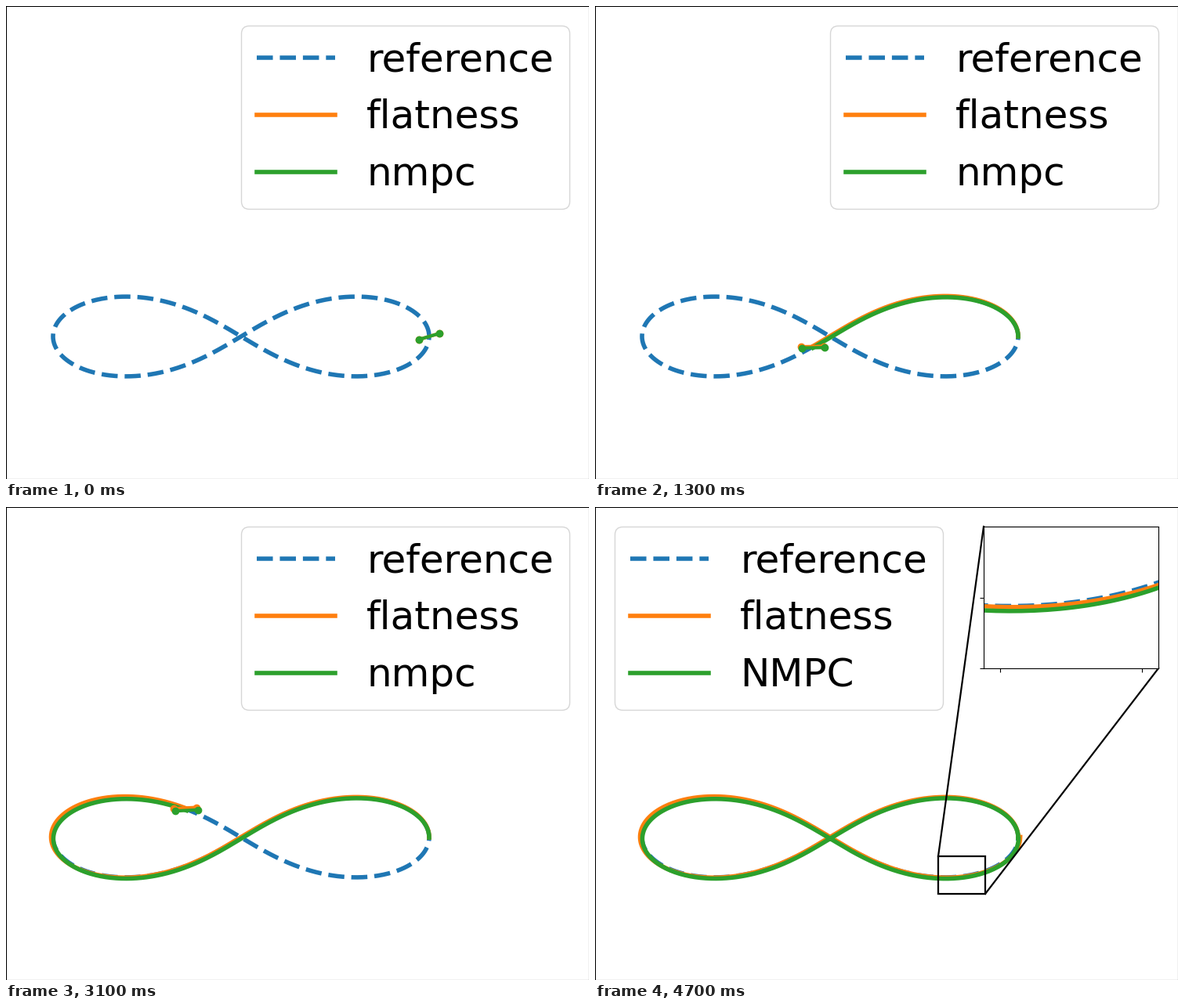
Animation, 744 px wide and 604 px high, one loop 5700 ms. Source, as a matplotlib script:

```python
import numpy as np
import matplotlib.pyplot as plt
from matplotlib.animation import FuncAnimation
from matplotlib.patches import Rectangle

W, H, DPI = 744, 604, 100
CX, CY, A = 300, 422, 240      # centre and half width of the figure eight
SQUASH = 0.6                   # vertical pixels per horizontal pixel
ARM = 14.8
RATE = 0.1348                  # path parameter per frame
STEPS, FRAMES = 47, 57
BLUE, ORANGE, GREEN = "C0", "C1", "C2"
ZOOM = (438, 446, 498, 494)
INSET = (496, 25, 719, 206)


def unit_path(t):
    d = 1 + np.sin(t) ** 2
    return np.cos(t) / d, np.sin(t) * np.cos(t) / d


def reference(t):
    x, y = unit_path(t)
    return CX + A * x, CY - A * SQUASH * y


def flatness(t):
    x, y = reference(t)
    ramp = 1 - np.exp(-t)
    return x + 2.6 * ramp * np.cos(t), y - ramp * (np.sin(2 * t) + 0.6)


def nmpc(t):
    x, y = reference(t)
    ramp = 1 - np.exp(-t)
    return x + 0.4 * ramp, y + 1.7 * ramp


def rotors(track, t):
    """End points of the craft, tilted by the acceleration it needs."""
    h = 0.01
    before, now, after = (np.array(unit_path(t + k * h)) for k in (-1, 0, 1))
    ax_, ay_ = (before - 2 * now + after) / h ** 2
    tilt = np.arctan2(-ax_, 6 + ay_)
    x, y = track(t)
    dx, dy = ARM * np.cos(tilt), ARM * SQUASH * np.sin(tilt)
    return [x - dx, x + dx], [y + dy, y - dy]


fig = plt.figure(figsize=(W / DPI, H / DPI), dpi=DPI)
ax = fig.add_axes([0, 0, 1, 1])
ax.set(xlim=(0, W), ylim=(H, 0), xticks=[], yticks=[])

loop = np.linspace(0, 2 * np.pi, 600)
ref_line, = ax.plot(*reference(loop), "--", color=BLUE, lw=4)
tracks = [(flatness, ORANGE), (nmpc, GREEN)]
trails = [ax.plot([], [], color=c, lw=4)[0] for _, c in tracks]
crafts = [ax.plot([], [], "o-", color=c, lw=3, ms=6)[0] for _, c in tracks]


def add_legend(loc, last):
    box = ax.legend([ref_line] + trails, ["reference", "flatness", last],
                    loc=loc, fontsize=36)
    return ax.add_artist(box)


run_legend = add_legend("upper right", "nmpc")
ax.legend_ = None
end_legend = add_legend("upper left", "NMPC")
ax.legend_ = None

# Magnified view, shown only at the end
x0, y0, x1, y1 = ZOOM
u0, v0, u1, v1 = INSET
zoom = fig.add_axes([u0 / W, 1 - v1 / H, (u1 - u0) / W, (v1 - v0) / H])
zoom.plot(*reference(loop), "--", color=BLUE, lw=4)
for track, color in tracks:
    zoom.plot(*track(loop), color=color, lw=4)
zoom.set(xlim=(x0, x1), ylim=(y1, y0))
scale_x, scale_y = (x1 - x0) / (u1 - u0), (y1 - y0) / (v1 - v0)
zoom.set_xticks([x0 + (p - u0) * scale_x for p in (517, 698)])
zoom.set_yticks([y0 + (p - v0) * scale_y for p in (116, 206)])
zoom.tick_params(labelbottom=False, labelleft=False)

frame = ax.add_patch(Rectangle((x0, y0), x1 - x0, y1 - y0, fill=False,
                               lw=1.6, zorder=4))
links = [ax.plot(xs, ys, color="k", lw=1.6, zorder=4)[0]
         for xs, ys in [((x0, u0), (y0, v0)), ((x1, u1), (y1, v1))]]
end_parts = [zoom, frame, end_legend] + links
run_parts = [run_legend] + crafts


def update(n):
    done = n >= STEPS
    t = 2 * np.pi if done else n * RATE
    for (track, _), trail, craft in zip(tracks, trails, crafts):
        trail.set_data(*track(np.linspace(0, t, 400)) if n else ([], []))
        craft.set_data(*rotors(track, t))
    for part in end_parts:
        part.set_visible(done)
    for part in run_parts:
        part.set_visible(not done)
    return trails + run_parts + end_parts


anim = FuncAnimation(fig, update, frames=FRAMES, interval=100,
                     init_func=lambda: update(0), repeat=True, repeat_delay=0)
plt.show()
```
